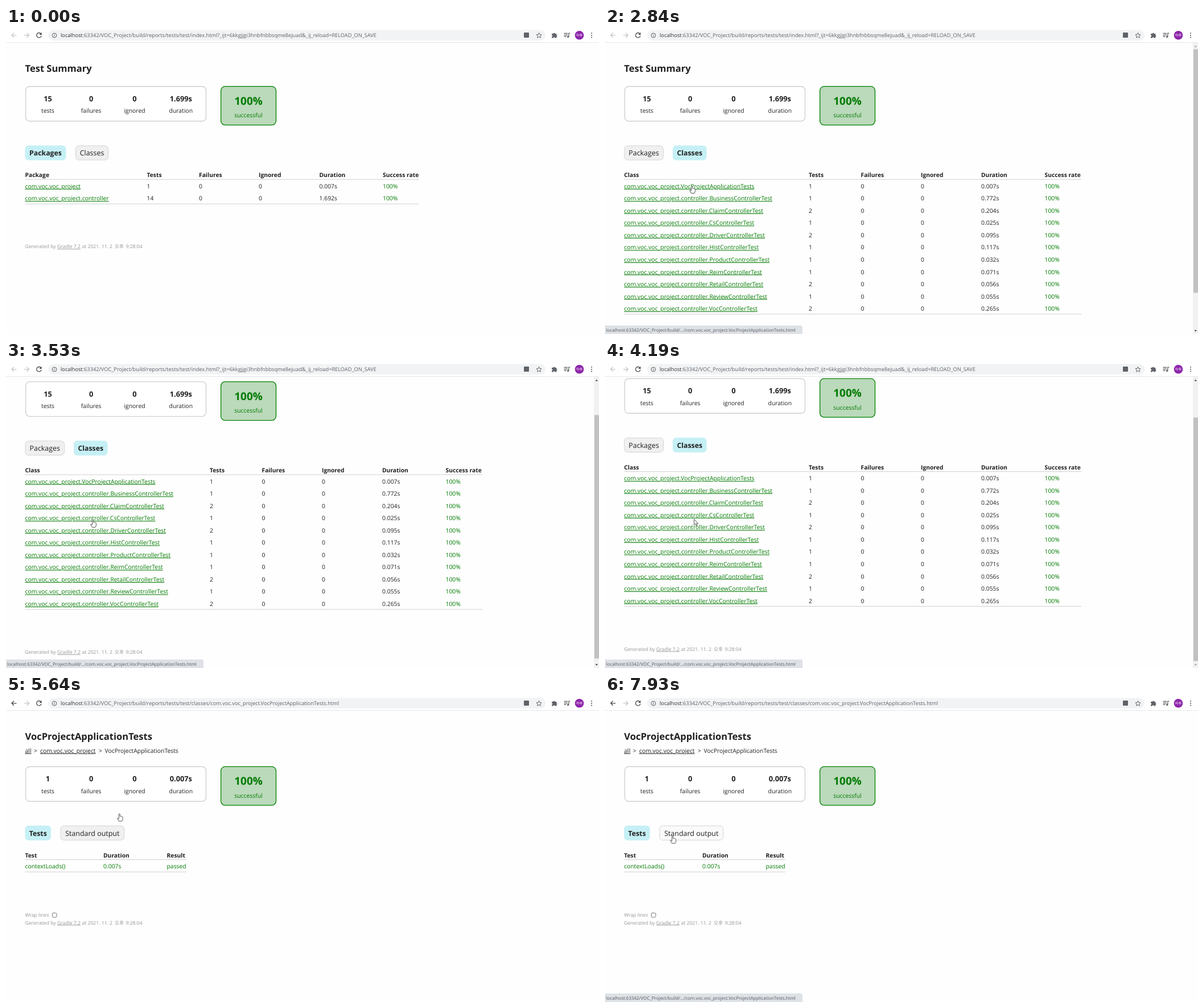
An HTML page for the animation above (8 s loop, 1042x538 px).

```html
<!DOCTYPE html>
<html lang="en">
<head>
<meta charset="utf-8">
<title>Test report</title>
<style>
  html, body { margin: 0; width: 100%; height: 100%; overflow: hidden; background: #fefefe; }
  svg { display: block; width: 100vw; height: 100vh; }
  text { font: 10.38px "Open Sans", "Noto Sans", "Noto Sans CJK KR", sans-serif; fill: #202020; text-rendering: geometricPrecision; white-space: pre; }
  .bold { font-weight: 700; font-size: 10.3px; }
  .title { font-weight: 700; font-size: 16.55px; }
  .count { font-weight: 700; font-size: 12.8px; }
  .rate { font-weight: 700; font-size: 18.9px; }
  .mid { text-anchor: middle; }
  .green { fill: #007a00; }
  .link { text-decoration: underline; }
  .foot { font-size: 8.6px; fill: #959595; }
  .url { font-size: 9.23px; fill: #5f6368; }
  .bar { font-size: 7.92px; fill: #54585d; }
  .tab rect { fill: #f0f0f0; stroke: #d4d4d4; }
  .tab text { font-size: 12.45px; }
  .tab.on rect { fill: #c5f0f5; stroke: #c5f0f5; }
  .tab.on text { font-size: 12.3px; font-weight: 700; }
  .tab.hover rect { fill: #fafafa; }
  .rule { stroke: #d0d0d0; }
  .icon { fill: none; stroke: #5f6368; stroke-width: 1.3; }
</style>
</head>
<body>
<svg id="stage" viewBox="0 0 1042 538"></svg>
<script>
const LOOP = 8000;
const ROW = 21.53;
const HOST = 'localhost';
const ROOT = ':63342/VOC_Project/';
const QUERY = 'index.html?_ijt=6kkgjjgi3hnbfnbbsqme8ejuad&amp;_ij_reload=RELOAD_ON_SAVE';
const PKG = 'com.voc.voc_project';
const MAIN = PKG + '.VocProjectApplicationTests';

const classes = [
  [MAIN, 1, '0.007s'],
  ...[['Business', 1, '0.772s'], ['Claim', 2, '0.204s'], ['Cs', 1, '0.025s'], ['Driver', 2, '0.095s'],
    ['Hist', 1, '0.117s'], ['Product', 1, '0.032s'], ['Reim', 1, '0.071s'], ['Retail', 2, '0.056s'],
    ['Review', 1, '0.055s'], ['Voc', 2, '0.265s']]
    .map(([name, n, time]) => [`${PKG}.controller.${name}ControllerTest`, n, time])
];
const packages = [[PKG, 1, '0.007s'], [PKG + '.controller', 14, '1.692s']];

const text = (x, y, s, cls = '') => `<text x="${x}" y="${y}" class="${cls}">${s}</text>`;
const rect = (x, y, w, h, r, attrs) => `<rect x="${x}" y="${y}" width="${w}" height="${h}" rx="${r}" ${attrs}/>`;
const rule = (y, x2) => `<path class="rule" d="M33.5 ${y}H${x2}"/>`;

function summary(dy, tests, duration) {
  const cells = [[73.5, tests, 'tests'], [149.7, 0, 'failures'], [226, 0, 'ignored'], [307.3, duration, 'duration']];
  return `<g transform="translate(0 ${dy})">`
    + rect(34.6, 102.7, 316.9, 61, 7, 'fill="#fff" stroke="#d0d0d0" stroke-width="1.4"')
    + cells.map(([x, n, label]) => text(x, 128.6, n, 'count mid') + text(x, 149.3, label, 'mid')).join('')
    + rect(377.6, 102.7, 96.9, 68, 7.5, 'fill="#bbd9bb" stroke="#008000" stroke-width="1.3"')
    + text(426, 134.8, '100%', 'rate green mid') + text(426, 157.3, 'successful', 'green mid') + '</g>';
}

const tab = (x, y, w, label, cls = '', id = '') =>
  `<g class="tab ${cls}" id="${id}">${rect(x, y, w, 25, 5.5, '')}${text(x + w / 2, y + 17.2, label, 'mid')}</g>`;

function table(first, cols, right, rows) {
  const heads = [first, 'Tests', 'Failures', 'Ignored', 'Duration', 'Success rate'];
  const line = ([name, n, time], i) => [name, n, 0, 0, time, '100%']
    .map((s, k) => text(cols[k], 281.8 + i * ROW, s, ['green link', '', '', '', '', 'green'][k])).join('');
  return heads.map((s, k) => text(cols[k], 262.3, s, 'bold')).join('') + rule(266.2, right)
    + rows.map(line).join('') + rule(266.2 + rows.length * ROW, right);
}

const footer = y => text(33.5, y, 'Generated by', 'foot') + text(90, y, 'Gradle 7.2', 'foot link')
  + text(133.5, y, 'at 2021. 11. 2', 'foot') + text(191, y, '오후', 'foot') + text(210.5, y, '9:28:04', 'foot');

const overview = text(33.5, 76.8, 'Test Summary', 'title') + summary(0, 15, '1.699s');

const pages = [
  overview + tab(34, 207, 71, 'Packages', 'on') + tab(122.5, 207, 57, 'Classes', '', 'classTab')
    + table('Package', [33.5, 247.5, 339, 444, 550.5, 662], 726, packages) + footer(387.3),

  overview + tab(34, 207, 68.5, 'Packages') + tab(119.5, 207, 58.5, 'Classes', 'on')
    + table('Class', [33.5, 358, 449.5, 555, 661, 772.5], 837, classes) + footer(581.2),

  text(33.5, 76.8, 'VocProjectApplicationTests', 'title')
    + text(33.5, 99.8, 'all', 'link') + text(49, 99.8, '&gt;') + text(60, 99.8, PKG, 'link')
    + text(163, 99.8, '&gt;') + text(173.5, 99.8, 'VocProjectApplicationTests')
    + summary(21.5, 1, '0.007s')
    + tab(34, 228.3, 44.5, 'Tests', 'on') + tab(96, 228.3, 111.5, 'Standard output', '', 'outTab')
    + ['Test', 'Duration', 'Result'].map((s, k) => text([33.5, 171, 282.5][k], 283.8, s, 'bold')).join('')
    + rule(287.7, 317)
    + ['contextLoads()', '0.007s', 'passed'].map((s, k) => text([33.5, 171, 282.5][k], 303.4, s, 'green')).join('')
    + rule(309.3, 317)
    + text(33.5, 388, 'Wrap lines', 'foot')
    + rect(81.5, 381.5, 7.5, 7.5, 1.5, 'fill="#fff" stroke="#767676"') + footer(401.5)
];

const toolbar = `<rect width="1042" height="25" fill="#fff"/><path d="M0 25.5H1042" stroke="#e4e6e8"/>`
  + rect(74, 3.5, 874, 18.5, 9.2, 'fill="#f1f3f4"')
  + `<path id="back" class="icon" d="M18.5 12.8H10M14 8.8L10 12.8L14 16.8"/>
  <path class="icon" style="stroke:#c4c6c8" d="M32 12.8H40.5M36.5 8.8L40.5 12.8L36.5 16.8"/>
  <path class="icon" style="stroke:#45484c" d="M61.2 10A4.2 4.2 0 1 0 62.1 13.6"/>
  <path d="M62.6 7.8V12H58.4Z" fill="#45484c"/>
  <circle class="icon" style="stroke-width:1" cx="85" cy="13" r="3.9"/>
  <path class="icon" d="M85 12.4V15.2M85 10.4V11.5" style="stroke-width:1"/>
  <text id="url" x="96" y="16.2" class="url"></text>
  <rect x="910" y="8" width="9" height="9" rx="1" fill="#5f6368"/>
  <path class="icon" style="stroke-width:1" d="M936.5 8.4L937.8 11.5L941 11.8L938.6 14L939.3 17.2L936.5 15.5L933.7 17.2L934.4 14L932 11.8L935.2 11.5Z"/>
  <path fill="#5f6368" d="M959 10H961.7A1.5 1.5 0 0 1 964.7 10H967.3V12.5A1.5 1.5 0 0 1 967.3 15.4V17.6H964.6A1.4 1.4 0 0 0 961.8 17.6H959V15.2A1.4 1.4 0 0 0 959 12.4Z"/>
  <path class="icon" d="M980.5 9.5H987M980.5 12.3H987M980.5 15H984.5M988.8 15.2V9.2H991.3"/>
  <circle cx="987.6" cy="15.4" r="1.7" fill="#5f6368"/>
  <circle cx="1007.5" cy="12.7" r="7.8" fill="#8e24aa"/>`
  + `<text x="1007.5" y="15" class="mid" style="font-size:6.2px;fill:#fff">하루</text>`
  + [9, 12.8, 16.6].map(y => `<circle cx="1029" cy="${y}" r="1.1" fill="#5f6368"/>`).join('');

const $ = id => document.getElementById(id);
$('stage').innerHTML = pages.map((p, i) => `<g id="page${i}">${p}</g>`).join('')
  + `<g id="scrollbar"><rect x="1033" y="26" width="9" height="512" fill="#f1f1f1"/>
    <rect id="thumb" x="1034" y="37.5" width="8" height="428" fill="#c1c1c1"/>
    <path id="up" d="M1035.5 33.5L1037.8 30.5L1040 33.5Z"/><path id="down" d="M1035.5 531L1037.8 534L1040 531Z"/></g>`
  + toolbar
  + `<g id="status"><path d="M0 523H344Q347 523 347 526V538H0Z" fill="#dee1e6"/><text id="hint" x="2" y="533.6" class="bar"></text></g>
  <circle id="click" r="8.5" fill="#f7e733" opacity=".8"/>
  <g id="cursor" fill="#fff" stroke="#444" stroke-width=".9" stroke-linejoin="round">
    <path id="arrow" d="M.5 .5V10.7L2.8 8.6L4.4 12.2L5.9 11.5L4.4 8H7.5Z"/>
    <path id="hand" d="M-1 1Q0-.4 1 1V5Q2 4.3 3 5.2Q4 4.6 4.6 5.7Q5.8 5.4 5.9 6.8V10Q5.6 12 4.5 13.5H-1.2L-3.8 8.6Q-3.4 7.3-1 9.2Z"/>
  </g>`;

// [time, value...] keys, joined by straight lines
const path = [
  [70, 1007, 525], [300, 720, 395], [520, 420, 262], [680, 245, 232], [810, 195, 249], [1020, 115, 249],
  [1350, 115, 249], [1570, 163, 216], [1700, 163, 216], [1770, 137, 224], [2100, 137, 224], [2380, 151, 275],
  [2780, 151, 275], [2840, 152.5, 277], [3860, 152.5, 277], [4120, 152.5, 277], [4190, 156, 276],
  [4790, 199.3, 206.5], [5900, 199.3, 206.5], [6310, 57, 247], [6440, 57, 247], [7060, 118.7, 245.5]
];
const scrolling = [[3250, 0], [3320, 11], [3390, 30.5], [3460, 53], [3530, 68], [3600, 73.5]];

function at(keys, t) {
  const i = keys.findIndex(k => k[0] > t);
  if (i < 0) return keys[keys.length - 1].slice(1);
  if (!i) return keys[0].slice(1);
  const [a, b] = [keys[i - 1], keys[i]];
  const p = (t - a[0]) / (b[0] - a[0]);
  return a.slice(1).map((v, k) => v + (b[k + 1] - v) * p);
}

const within = (t, ...spans) => spans.some(([a, b]) => t >= a && t < b);
const show = (id, on) => $(id).setAttribute('visibility', on ? 'visible' : 'hidden');
const move = (id, x, y) => $(id).setAttribute('transform', `translate(${x} ${y})`);
const write = (id, html) => { if ($(id).dataset.s !== html) $(id).innerHTML = $(id).dataset.s = html; };

function hint(t, y) {
  if (t < 2170) return HOST + ROOT + 'build/reports/tests/test/index.html?_ijt=6kkgjjgi3hnbfnbbsq...';
  const row = within(t, [4260, 4790]) ? Math.max(0, Math.round((y - 204.5) / ROW)) : 0;
  return HOST + ROOT + (row ? '' : 'build/') + `.../${classes[row][0]}.html`;
}

function draw(t) {
  const page = t < 1840 ? 0 : t < 5260 ? 1 : 2;
  const [x, y] = at(path, t);
  const [scroll] = at(scrolling, t);

  pages.forEach((_, i) => { $('page' + i).style.display = i === page ? '' : 'none'; });
  move('page1', 0, -scroll);
  show('scrollbar', page === 1);
  move('thumb', 0, scroll * 0.82);
  $('up').setAttribute('fill', scroll > 0 ? '#505050' : '#a3a3a3');
  $('down').setAttribute('fill', scroll < 73.5 ? '#505050' : '#a3a3a3');

  $('back').style.stroke = page === 2 ? '#45484c' : '#c4c6c8';
  write('url', `<tspan fill="#303336">${HOST}</tspan>${ROOT}build/reports/tests/test/`
    + (page === 2 ? `classes/${MAIN}.html` : QUERY));

  $('classTab').classList.toggle('hover', t >= 1540);
  $('outTab').classList.toggle('hover', t >= 6990);
  show('status', within(t, [1770, 2170], [2310, 5640], [6990, LOOP]));
  write('hint', hint(t, y));

  const hand = within(t, [1770, 2170], [2840, 3860], [4790, 5970], [7930, LOOP]);
  show('cursor', t >= 70);
  $('arrow').style.display = hand ? 'none' : '';
  $('hand').style.display = hand ? '' : 'none';
  move('cursor', x, y);
  show('click', within(t, [1770, 1840], [5120, 5260]));
  move('click', x - 1, y + 1.5);
}

function tick() {
  draw(performance.now() % LOOP);
  requestAnimationFrame(tick);
}
tick();
</script>
</body>
</html>
```
